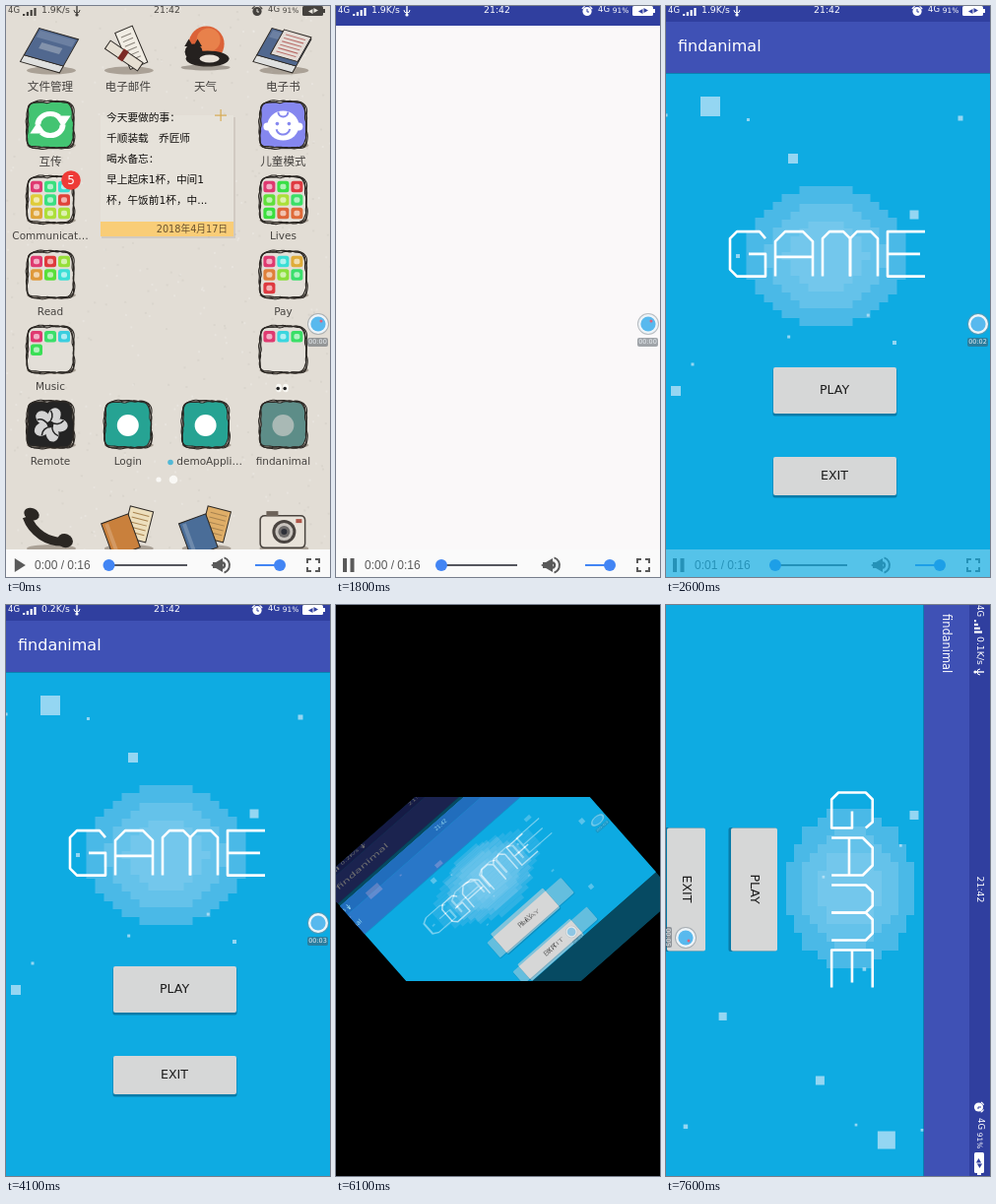
Recreate the animation shown at these times as an HTML page with a canvas. Size 329 px wide and 580 px high, loop 8000 ms.

```html
<!DOCTYPE html>
<html lang="zh">
<head>
<meta charset="utf-8">
<title>Screen recording</title>
<style>
html, body { margin: 0; width: 100%; height: 100%; overflow: hidden; background: #000; }
canvas { display: block; width: 329px; height: 580px; }
</style>
</head>
<body>
<canvas id="stage"></canvas>
<script>
const W = 329, H = 580, LOOP = 8000, SHRINK = W / H, TAU = Math.PI * 2;
const SANS = '"DejaVu Sans", "Noto Sans CJK SC", "Noto Sans CJK", sans-serif';
const UI = '"Liberation Sans", Arial, sans-serif';
const INK = '#2b2723', INDIGO = '#303f9f';
const dpr = window.devicePixelRatio || 1;

function prepare(canvas) {
  canvas.width = W * dpr;
  canvas.height = H * dpr;
  return canvas.getContext('2d');
}
const buffer = prepare(document.createElement('canvas'));
let c = prepare(document.getElementById('stage'));

// ---------- helpers ----------
const clamp = v => Math.min(1, Math.max(0, v));
const mix = (a, b, k) => a + (b - a) * k;
function random(seed) {
  return () => (seed = (seed * 16807) % 2147483647) / 2147483647;
}
function rect(x, y, w, h, fill) {
  c.fillStyle = fill;
  c.fillRect(x, y, w, h);
}
function round(x, y, w, h, r, fill) {
  c.beginPath();
  c.roundRect(x, y, w, h, r);
  c.fillStyle = fill;
  c.fill();
}
function oval(x, y, rx, ry, fill, turn = 0) {
  c.beginPath();
  c.ellipse(x, y, rx, ry, turn, 0, TAU);
  c.fillStyle = fill;
  c.fill();
}
const disc = (x, y, r, fill) => oval(x, y, r, r, fill);
function arc(x, y, r, from, to, color, width) {
  c.beginPath();
  c.arc(x, y, r, from, to);
  c.strokeStyle = color;
  c.lineWidth = width;
  c.stroke();
}
function line(points, color, width = 1) {
  c.beginPath();
  points.forEach(([x, y]) => c.lineTo(x, y));
  c.strokeStyle = color;
  c.lineWidth = width;
  c.stroke();
}
function triangle(x, y, r, turn, fill) {
  c.beginPath();
  for (let i = 0; i < 3; i++) c.lineTo(x + r * Math.cos(turn + i * TAU / 3), y + r * Math.sin(turn + i * TAU / 3));
  c.fillStyle = fill;
  c.fill();
}
function slab(x, y, w, h, fill) {
  rect(x, y, w, h, fill);
  c.strokeStyle = INK;
  c.lineWidth = 1;
  c.strokeRect(x, y, w, h);
}
function ruled(x, y, w, rows, gap, color) {
  for (let i = 0; i < rows; i++) rect(x, y + i * gap, w, 1, color);
}
function text(s, x, y, size, color, align = 'left', font = SANS) {
  c.font = `${size}px ${font}`;
  c.textAlign = align;
  c.textBaseline = 'middle';
  c.fillStyle = color;
  c.fillText(s, x, y);
}
function at(x, y, draw, turn = 0) {
  c.save();
  c.translate(x, y);
  c.rotate(turn);
  draw();
  c.restore();
}
// Draws a group as one translucent layer.
function faded(alpha, draw) {
  if (alpha <= 0) return;
  const under = c;
  c = buffer;
  c.setTransform(1, 0, 0, 1, 0, 0);
  c.clearRect(0, 0, c.canvas.width, c.canvas.height);
  c.setTransform(under.getTransform());
  c.save();
  draw();
  c.restore();
  c = under;
  c.save();
  c.setTransform(1, 0, 0, 1, 0, 0);
  c.globalAlpha = Math.min(1, alpha);
  c.drawImage(buffer.canvas, 0, 0);
  c.restore();
}

// ---------- status bar and recorder bubble ----------
function bolt(color) {
  triangle(-2, 0.5, 3, Math.PI, color);
  triangle(2, -0.5, 3, 0, color);
}
function status(w, y, speed, color, hole, shift = 0) {
  text('4G', 2 - shift / 2, y, 8.5, color);
  for (let i = 0; i < 4; i++) rect(17 - shift / 2 + i * 3.8, y + 3 - i * 2, 2.2, 2 + i * 2, color);
  text(speed, 36 - shift, y, 9.3, color);
  at(72 - shift, y, () => {
    rect(-0.7, -5, 1.4, 10, color);
    arc(0, -1, 3, 0, Math.PI, color, 1);
    disc(0, 4, 1.6, color);
  });
  text('21:42', w / 2 - 1, y, 9.3, color, 'center');
  at(w - 74 + shift, y, () => {
    disc(0, 0.5, 4.6, color);
    arc(0, 0.5, 5.6, -2.7, -2, color, 1.2);
    arc(0, 0.5, 5.6, -1.1, -0.4, color, 1.2);
    line([[0, -2], [0, 1], [2, 1]], hole, 1);
  });
  text('4G', w - 57 + shift, y - 1, 8.5, color, 'center');
  text('91%', w - 40 + shift, y, 7.4, color, 'center');
  at(w - 17 + shift, y, () => {
    round(-11, -5, 21, 10, 1.5, color);
    rect(10, -2, 2, 4, color);
    bolt(hole);
  });
}
function bubble(x, y, time, dot) {
  round(x - 11, y + 14, 21, 9, 2, 'rgba(70,80,90,.5)');
  text(time, x - 0.5, y + 18.5, 6.5, '#e8eef2', 'center');
  disc(x, y, 11, 'rgba(130,140,150,.55)');
  disc(x, y, 10, '#eef4f8');
  disc(x, y, 7.6, '#58b9ee');
  if (dot) disc(x + 3, y - 3, 1.5, '#e2607a');
}

// ---------- home screen ----------
// A square with soft corners and a slightly shaky edge.
function sketch(r, phase) {
  c.beginPath();
  for (let a = 0; a < TAU; a += 0.05) {
    const cos = Math.cos(a), sin = Math.sin(a);
    const edge = Math.pow(cos ** 6 + sin ** 6, -1 / 6);
    const k = r * edge + 0.6 * Math.sin(a * 5 + phase) + 0.4 * Math.sin(a * 13 + phase * 2);
    c.lineTo(k * cos * (1 + sin * 0.04), k * sin);
  }
  c.closePath();
}
const shadow = () => oval(1, 21, 25, 4, 'rgba(85,70,55,.4)');
function tile(fill, mark) {
  shadow();
  sketch(23, 1);
  c.fillStyle = fill;
  c.fill();
  for (let i = 0; i < 3; i++) {
    sketch(23 + i * 0.5, 1 + i * 1.7);
    c.strokeStyle = INK;
    c.lineWidth = 1.1;
    c.stroke();
  }
  mark();
}
const folder = (count, seed) => () => tile('#e3dfd8', () => {
  const rnd = random(seed);
  for (let i = 0; i < count; i++) {
    const x = -20 + (i % 3) * 14, y = -19 + Math.floor(i / 3) * 13.5;
    round(x, y, 12, 11.5, 2.5, `hsl(${(rnd() * 250 + 340) % 360} 72% 55%)`);
    round(x + 3, y + 3, 6, 5.5, 2, 'rgba(255,255,255,.6)');
  }
});
const book = loose => () => {
  shadow();
  c.transform(0.95, 0.27, -0.48, 0.85, 0, -3);
  slab(-20, 16, 42, 8, '#dfe0df');
  slab(-20, -16, 42, 32, '#51688f');
  rect(-18, -14, 38, 8, '#6c80a2');
  if (!loose) return rect(-10, -2, 22, 7, '#8292ab');
  slab(-8, -18, 29, 29, '#e4dcd6');
  ruled(-4, -14, 21, 6, 4, '#b5635f');
};
function letter() {
  shadow();
  at(3, -2, () => {
    slab(-9, -20, 19, 40, '#f1ede4');
    ruled(-5, -14, 11, 6, 5, '#8b857c');
  }, -0.4);
  at(-4, 6, () => {
    slab(-20, -5, 40, 10, '#e6dfd2');
    rect(-4, -6, 6, 12, '#7c2a24');
  }, 0.6);
}
function sunCat() {
  disc(1, -6, 18, '#db6238');
  disc(3, -10, 12, '#e8814b');
  oval(2, 9, 22, 8, '#25211f');
  oval(-12, 2, 9, 8, '#25211f');
  for (const x of [-17, -8]) triangle(x, -6, 5, -Math.PI / 2, '#25211f');
  oval(4, 9, 10, 4, '#e8e1d8');
  oval(0, 18, 25, 3, 'rgba(70,60,50,.4)');
}
function syncMark() {
  for (const turn of [0, Math.PI]) at(0, 0, () => {
    c.scale(1.15, 1);
    arc(0, 0, 11, Math.PI, Math.PI * 1.75, '#fff', 5);
    triangle(11, -5, 8, Math.PI / 2, '#fff');
  }, turn);
}
function childMark() {
  oval(0, 1, 16, 15, '#fff');
  for (const side of [-1, 1]) {
    disc(side * 16, 2, 4, '#fff');
    disc(side * 6, -1, 1.8, '#8587ef');
  }
  arc(0, -13, 5, 0, Math.PI, '#8587ef', 2);
  arc(0, 3, 7, 0.2, 2.9, '#8587ef', 2);
}
function fanMark() {
  for (let i = 0; i < 5; i++) at(0, 0, () => oval(4, -9, 6.5, 8, '#d4d4d4', 0.4), i * TAU / 5);
  for (let i = 0; i < 5; i++) at(0, 0, () => arc(-7, -9, 9, -0.6, 1.1, '#242424', 1.5), i * TAU / 5);
  disc(0, 0, 3, '#242424');
}
const appMark = color => () => disc(0, 1, 11, color);
function handset() {
  shadow();
  arc(12, -24, 38, 1.5, 2.8, INK, 9);
  oval(-19, -14, 8, 6, INK, 0.4);
  oval(15, 13, 8, 7, INK, 0.4);
}
const envelope = (cover, sheet) => () => {
  shadow();
  at(9, -3, () => {
    slab(-11, -17, 24, 32, sheet);
    ruled(-7, -12, 17, 5, 5, '#a8834f');
  }, 0.25);
  at(-6, 4, () => {
    slab(-17, -15, 29, 36, cover);
    rect(-14, -13, 4, 32, 'rgba(255,255,255,.2)');
  }, -0.35);
};
function camera() {
  shadow();
  round(-24, -13, 47, 34, 5, '#4a443f');
  round(-22.5, -11.5, 44, 31, 4, '#e8e2d9');
  rect(-17, -17, 12, 5, '#6c6259');
  ['#4a4440', '#c9c4be', '#6d6a69', '#2e3038'].forEach((fill, i) => disc(1, 4, 12 - i * 3, fill));
  rect(13, -9, 6, 4, '#b0574a');
}
function eyes() {
  for (const x of [277, 284]) {
    oval(x, 388, 3, 4.2, '#faf9f4');
    disc(x - 0.8, 388.5, 1.8, '#222');
  }
}
function note() {
  rect(97, 113, 136, 123, 'rgba(80,70,60,.12)');
  rect(96, 111, 135, 123, '#e6e2da');
  rect(96, 219, 135, 15, '#f9cd77');
  rect(212, 110.5, 12, 1.2, '#d8ab54');
  rect(217.5, 105, 1.2, 12, '#d8ab54');
  ['今天要做的事：', '千顺装载   乔匠师', '喝水备忘：', '早上起床1杯，中间1', '杯，午饭前1杯，中...']
    .forEach((s, i) => text(s, 102, 114.5 + i * 21, 10.7, '#100e0c'));
  text('2018年4月17日', 225, 227, 9.7, '#6a5330', 'right');
}
function paper() {
  rect(0, 0, W, H, '#e2ddd5');
  const rnd = random(71);
  for (let i = 0; i < 500; i++)
    rect(rnd() * W, rnd() * H, 2, 2, rnd() < 0.5 ? 'rgba(255,255,255,.2)' : 'rgba(120,110,95,.07)');
}

// Each row of the grid: four columns of [label, drawing].
const APPS = [
  [['文件管理', book(false)], ['电子邮件', letter], ['天气', sunCat], ['电子书', book(true)]],
  [['互传', () => tile('#43c472', syncMark)], , , ['儿童模式', () => tile('#8587ef', childMark)]],
  [['Communicat…', folder(9, 5)], , , ['Lives', folder(9, 12)]],
  [['Read', folder(6, 31)], , , ['Pay', folder(7, 44)]],
  [['Music', folder(4, 58)], , , ['', folder(3, 67)]],
  [['Remote', () => tile('#242424', fanMark)], ['Login', () => tile('#26a393', appMark('#fff'))],
    ['demoAppli…', () => tile('#26a393', appMark('#fff'))], ['findanimal', () => tile('#5d8d88', appMark('#a9b9b5'))]],
  [['', handset], ['', envelope('#c9803c', '#eddfbd')], ['', envelope('#4a6d98', '#dfae68')], ['', camera]]
];
function home() {
  paper();
  status(W, 5, '1.9K/s', '#45423e', '#e8e5dd');
  note();
  APPS.forEach((row, r) => row.forEach(([label, icon], col) => {
    const x = 45 + col * 78.8, y = 44.5 + r * 76.1 + (r === 6 ? 29 : 0);
    at(x, y, icon);
    text(label, x + (label.startsWith('demo') ? 4 : 0), y + 38, r < 2 ? 11.6 : 10.5, '#45423f', 'center');
  }));
  eyes();
  disc(66, 177, 9.8, '#ee3b37');
  text('5', 66, 177.5, 12, '#fff', 'center');
  disc(167, 463.5, 2.8, '#52b9d6');
  disc(155, 481, 2.6, '#f9f8f5');
  disc(170, 481, 4.3, '#f9f8f5');
}

// ---------- game screen ----------
// Key squares [x, y, size]; the specks between them are random.
const SQUARES = [[45, 102, 20], [129, 155, 10], [252, 212, 9], [10, 391, 10], [299, 114, 5], [73, 254, 4], [232, 342, 4]];
const speck = random(23);
for (let i = 0; i < 5; i++) SQUARES.push([speck() * W, 100 + speck() * 430, 3]);

function pixelOval(x, y, rx, ry, fill) {
  const rows = Math.round(ry / 4), h = ry * 2 / rows;
  for (let i = 0; i < rows; i++) {
    const dy = (i + 0.5) / rows * 2 - 1;
    const half = Math.round(Math.sqrt(1 - dy * dy) * rx / 9) * 9;
    const top = Math.round(y - ry + i * h);
    rect(x - half, top, half * 2, Math.round(y - ry + (i + 1) * h) - top, fill);
  }
}
function gameTitle(x, y, h) {
  const stroke = points => line(points, '#fff', 2.6);
  const arch = (left, w, cut) => stroke([[left, h], [left, cut], [left + cut, 0],
    [left + w - cut, 0], [left + w, cut], [left + w, h]]);
  const mid = h / 2;
  at(x, y, () => {
    c.lineJoin = 'round';
    stroke([[36, 7], [30, 0], [7, 0], [0, 7], [0, h - 7], [7, h], [36, h], [36, mid], [19, mid]]);
    arch(46, 38, 10);
    stroke([[46, mid + 3], [84, mid + 3]]);
    arch(94, 28, 7);
    arch(122, 28, 7);
    stroke([[198, 0], [160, 0], [160, h], [198, h]]);
    stroke([[160, mid], [193, mid]]);
  });
}
function button(label, x, y, h) {
  round(x - 0.5, y + 1, 126, h + 1.5, 2, 'rgba(0,50,80,.4)');
  round(x, y, 125, h, 2, '#d6d7d7');
  text(label, x + 62, y + h / 2 + 0.5, 12.6, '#1c1c1c', 'center');
}
function scene(w, h, top, bar, blobY, rx, ry, squares, playY, exitY) {
  rect(0, 0, w, h, '#0eabe2');
  rect(0, top, w, bar - top, '#3f51b5');
  rect(0, 0, w, top, INDIGO);
  rect(0, bar, w, 1, 'rgba(0,50,90,.35)');
  const mid = w / 2 - 2;
  ['#4ab9e7', '#64c2ea', '#73c7ec'].forEach((fill, i) =>
    pixelOval(mid, blobY, rx * (1 - i * 0.25), ry * (1 - i * 0.25), fill));
  squares.forEach(([x, y, s]) => rect(x - s / 2, y - s / 2, s, s, 'rgba(200,232,248,.72)'));
  gameTitle(w / 2 - 99.5, blobY - ry * 0.35, ry * 0.64);
  button('PLAY', w / 2 - 55.5 - (w > h ? 8 : 0), playY, 47);
  button('EXIT', w / 2 - 55.5 - (w > h ? 8 : 0), exitY, 39);
}
function portrait(t) {
  scene(W, H, 16, 68, 254, 81, 71, SQUARES, 367, 458);
  text('findanimal', 12, 42, 16, '#fff');
  status(W, 5, t < 3000 ? '1.9K/s' : '0.2K/s', '#fff', INDIGO);
}
// The backdrop is the same picture on its side, stretched to the wide screen.
function landscape(t) {
  const turned = SQUARES.map(([x, y, s]) => [660 - y * 1.142, 69 + x * 0.803, s * 0.9]);
  scene(H, W, 21, 67, 142, 81, 65, turned, 216, 289);
  text('findanimal', 9, 45, 11.4, '#fff');
  status(H, 11, '0.1K/s', '#fff', INDIGO, 4);
  bubble(338, 309, '00:05', t >= 7400);
}

// ---------- player controls ----------
function controls(t) {
  const ink = '#5a5a5a', blue = '#4285f4', y = 568;
  rect(0, 552, W, 28, '#fafafa');
  if (t < 1300) at(12.5, y, () => {
    c.scale(0.92, 1);
    triangle(0, 0, 8, 0, ink);
  });
  else for (const x of [7, 14.5]) rect(x, y - 7, 4, 14, ink);
  text(`0:0${t < 2300 ? 0 : 1} / 0:16`, 29, y + 0.5, 12, ink, 'left', UI);
  rect(105, y - 1, 79, 2, '#54565e');
  disc(104.5 + 79 * Math.max(0, t - 1300) / 16000, y, 6, blue);
  rect(210, y - 3, 5, 6, ink);
  triangle(216, y, 8, Math.PI, ink);
  arc(219, y, 3, -1.2, 1.2, ink, 2.5);
  arc(219, y, 8, -1.25, 1.25, ink, 2);
  rect(253, y - 1, 25, 2, blue);
  disc(278, y, 6, blue);
  for (let i = 0; i < 4; i++) at(312, y, () => line([[6, 2], [6, 6], [2, 6]], ink, 2), i * TAU / 4);
}

// ---------- timeline ----------
function launchWindow(t) {
  const k = clamp((t - 1300) / 400), s = mix(0.8, 1, k);
  faded(k, () => {
    c.translate(W / 2, H / 2);
    c.scale(s, s);
    c.translate(-W / 2, -H / 2);
    rect(0, 0, W, H, '#faf8f9');
    rect(0, 0, W, 20, INDIGO);
    status(W, 5, '1.9K/s', '#fff', INDIGO);
  });
}
function upright(t) {
  if (t < 1700) home();
  if (t >= 1400 && t < 2500) launchWindow(t);
  faded(clamp((t - 2200) / 300), () => portrait(t));
  const seconds = t < 2000 ? 0 : t < 2600 ? 1 : t < 4000 ? 2 : 3;
  bubble(317, 323, '00:0' + seconds, t < 2300);
  faded(clamp((2720 - t) / 400), () => controls(t));
}
function clipTo(x, y, w, h) {
  c.beginPath();
  c.rect(x, y, w, h);
  c.clip();
}
// The old screen turns upright, morphs into the wide shape and fades over the new one.
function turning(t) {
  const p = t < 6100 ? 0 : t >= 6500 ? 1 : 1 - 0.46 * Math.pow(0.35, (t - 6100) / 100);
  const w = mix(W * SHRINK, W, p), h = mix(W, W * SHRINK, p);
  clipTo(0, 195, W, 187);
  c.translate(W / 2, 288.5);
  c.rotate(-Math.PI / 2 * (1 - p));
  clipTo(-w / 2, -h / 2, w, h);
  if (p > 0) at(0, 0, () => {
    c.scale(SHRINK, SHRINK);
    c.translate(-H / 2, -W / 2);
    clipTo(0, 0, H, W);
    landscape(t);
  });
  faded(p ? (1 - p) * 0.95 : 1, () => {
    c.scale(w / W, h / H);
    c.translate(-W / 2, -H / 2);
    portrait(t);
    bubble(317, 323, '00:03', false);
  });
}
function sideways(t) {
  c.translate(W, 0);
  c.rotate(Math.PI / 2);
  landscape(t);
}
function draw(t) {
  c.setTransform(dpr, 0, 0, dpr, 0, 0);
  rect(0, 0, W, H, '#000');
  c.save();
  if (t < 4300) upright(t);
  else if (t < 7600) turning(t);
  else sideways(t);
  c.restore();
}

const start = performance.now();
let last = -1;
function tick(now) {
  const t = Math.floor((Math.max(0, now - start) % LOOP) / 100) * 100;
  if (t !== last) draw(last = t);
  requestAnimationFrame(tick);
}
tick(start);
</script>
</body>
</html>
```
